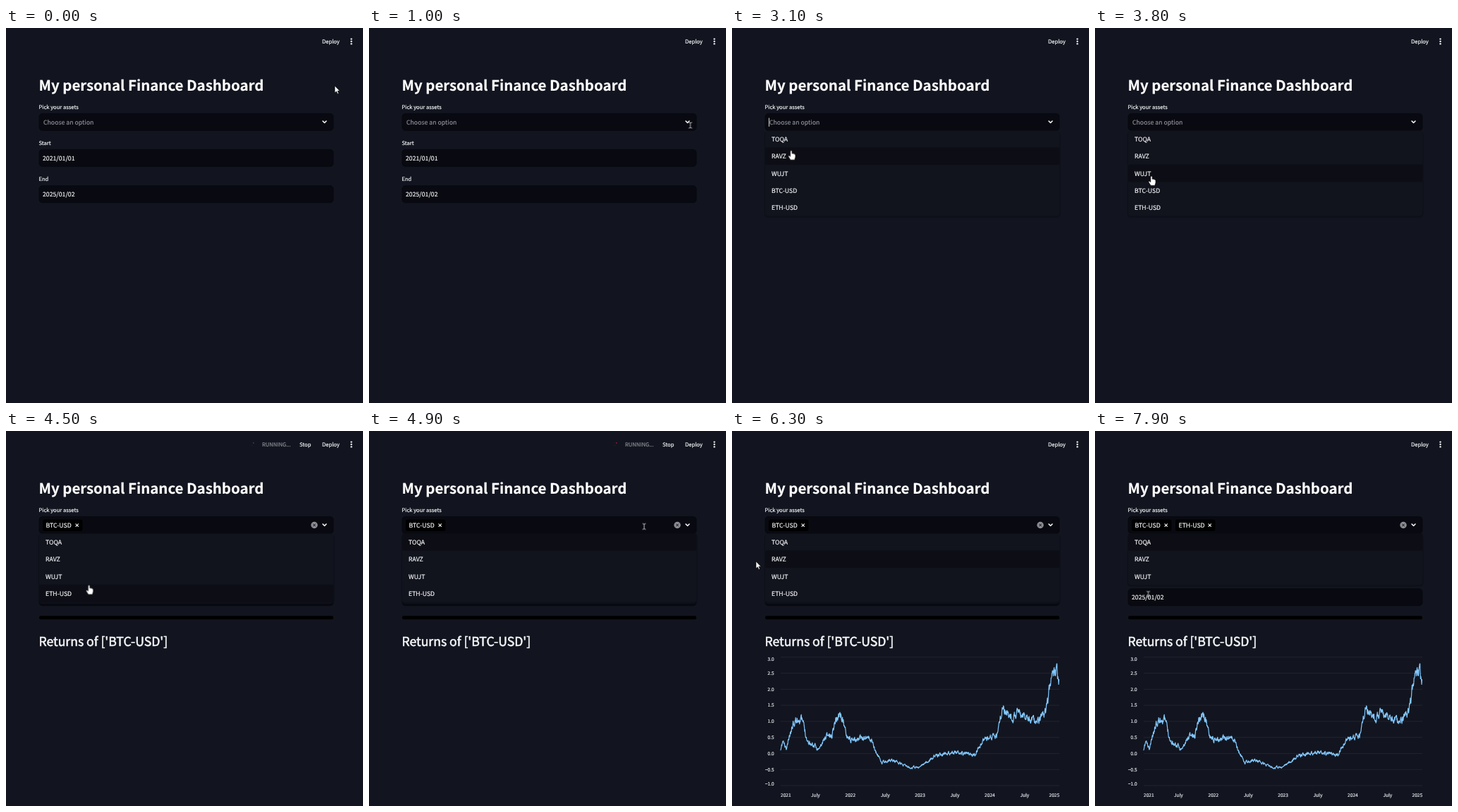
An HTML page that plays this animation: 506 px wide and 532 px high, repeating every 8 s.

```html
<!DOCTYPE html>
<html lang="en">
<head>
<meta charset="utf-8">
<title>Finance dashboard</title>
<style>
  html, body { margin: 0; width: 100%; height: 100%; overflow: hidden; background: #12151f; }
  svg { display: block; width: 506px; height: 532px; }
  text {
    font-family: "Noto Sans CJK JP", "Noto Sans CJK SC", "Noto Sans CJK KR", "Noto Sans CJK", "Open Sans", sans-serif;
    font-size: 8.72px; color: #f7f8fa; fill: currentColor; stroke: currentColor; stroke-width: .18px;
    text-rendering: geometricPrecision; white-space: pre;
  }
  .title { font-size: 20.42px; font-weight: 700; color: #fff; }
  .heading { font-size: 17.6px; stroke-width: .55px; }
  .small { font-size: 7.6px; }
  .axis { font-size: 6.6px; color: #eceff4; }
  .muted { color: #8d8f96; }
  .field { fill: #090a11; stroke: #07080d; stroke-width: .8; }
</style>
</head>
<body>
<svg id="stage" viewBox="0 0 506 532"></svg>
<script>
const LOOP = 8000, TICK = 100;
const LEFT = 47, WIDTH = 417, FIELD = 24, ROW = 24.2, TOP = 145.6;
const OPEN = 1900, FIRST_PICK = 4400, SECOND_PICK = 7900;
const fieldTops = [121.4, 172.4, 223.8];
const stage = document.getElementById('stage');

function add(parent, tag, attrs = {}, content) {
  const el = document.createElementNS('http://www.w3.org/2000/svg', tag);
  for (const key in attrs) el.setAttribute(key, attrs[key]);
  if (content !== undefined) el.textContent = content;
  parent.append(el);
  return el;
}
const group = (parent = stage) => add(parent, 'g');
const label = (parent, x, y, content, cls = '', anchor = 'start') =>
  add(parent, 'text', { x, y, class: cls, 'text-anchor': anchor }, content);
const box = (parent, x, y, width, height, rx, attrs) =>
  add(parent, 'rect', { x, y, width, height, rx, ...attrs });
const line = (parent, d, stroke, width) =>
  add(parent, 'path', { d, fill: 'none', stroke, 'stroke-width': width, 'stroke-linecap': 'round', 'stroke-linejoin': 'round' });
const cross = (parent, x, y, r, color, width) =>
  line(parent, `M${x - r} ${y - r}L${x + r} ${y + r}M${x - r} ${y + r}L${x + r} ${y - r}`, color, width);

// Play valueAt(time), held for one tick at a time.
function track(el, prop, valueAt) {
  const frames = [];
  for (let t = 0; t < LOOP; t += TICK)
    frames.push({ offset: t / LOOP, [prop]: valueAt(t), easing: 'steps(1, end)' });
  frames.push({ ...frames[frames.length - 1], offset: 1 });
  el.animate(frames, { duration: LOOP, iterations: Infinity });
}
const show = (el, from, to = LOOP) => track(el, 'opacity', t => Number(t >= from && t < to));

// Header
label(stage, 448, 22, 'Deploy', 'small');
for (const y of [15.6, 19, 22.4]) add(stage, 'circle', { cx: 489.5, cy: y, r: 1.2, fill: '#f7f8fa' });
const running = group();
label(running, 363, 22, 'RUNNING...', 'small muted');
label(running, 416, 22, 'Stop', 'small');
line(running, 'M350.5 16.5l.6 1', '#a01f35', 1.2);
line(running, 'M348 20l1 .6', '#431725', 1);
show(running, 4500, 5100);

// Form
label(stage, 46.5, 89.3, 'My personal Finance Dashboard', 'title');
['Pick your assets', 'Start', 'End'].forEach((name, i) => label(stage, 46.5, fieldTops[i] - 6.9, name, 'small'));
for (const y of fieldTops) box(stage, LEFT, y, WIDTH, FIELD, 4.5, { class: 'field' });
label(stage, 52, 187.9, '2021/01/01');
label(stage, 52, 239.3, '2025/01/02');
show(label(stage, 53, 136.9, 'Choose an option', 'muted'), 0, FIRST_PICK);
line(stage, 'M449 132l2.5 2.5l2.5 -2.5', '#fff', 1.5);

function chip(x, name, from) {
  const g = group();
  box(g, x, 125.5, 56.5, 16.6, 3, { fill: '#000' });
  label(g, x + 4.5, 136.9, name);
  cross(g, x + 48.7, 133.6, 1.8, '#f7f8fa', 1.1);
  show(g, from);
}
chip(52, 'BTC-USD', FIRST_PICK);
chip(114, 'ETH-USD', SECOND_PICK);
const clear = group();
add(clear, 'circle', { cx: 437, cy: 133.5, r: 4.7, fill: '#8c8e94' });
cross(clear, 437, 133.5, 1.5, '#0a0c13', 1);
show(clear, FIRST_PICK);

// Results
const results = group();
box(results, LEFT, 262.2, WIDTH, 5, 2.2, { fill: '#000' });
label(results, 46.5, 304.5, "Returns of ['BTC-USD']", 'heading');
show(results, 4500);

const chart = group();
for (let i = 0; i <= 8; i++) {
  const end = Math.sign(i % 8 ? 0 : i - 4);
  const y = 320.8 + i * 22.78;
  add(chart, 'path', { d: `M69 ${y}H464`, stroke: '#292c36', 'stroke-width': .7 });
  label(chart, 59.7, y + 2.3 - end * 2.8, (3 - i / 2).toFixed(1).replace('-', '\u2212'), 'axis', 'end');
  label(chart, 69 + i * 49.4, 519, i % 2 ? 'July' : 2021 + i / 2, 'axis', ['start', 'middle', 'end'][end + 1]);
}

const trend = [
  [69, 455], [72, 440], [77, 452], [87, 412], [97, 407], [101, 415], [107, 440], [123, 452], [135, 430], [141, 434],
  [146, 411], [153, 401], [158, 412], [161, 427], [170, 440], [192, 433], [200, 442], [203, 455], [213, 471],
  [226, 466], [251, 477], [266, 477], [289, 460], [316, 455], [344, 460], [358, 437], [375, 433],
  [384, 392], [396, 407], [408, 395], [416, 407], [432, 414], [445, 398], [452, 352], [460, 342], [464, 357]
];
let seed = 11;
const random = () => (seed = (seed * 16807) % 2147483647) / 2147483647;

// Noise grows with the price, like real returns.
function priceLine() {
  const points = [];
  let noise = 0;
  for (let x = 69, k = 0; x <= 463.6; x += .4) {
    while (x > trend[k + 1][0]) k++;
    const [x0, y0] = trend[k], [x1, y1] = trend[k + 1];
    const y = y0 + (y1 - y0) * (x - x0) / (x1 - x0);
    noise = noise * .6 + (random() - .5) * .1;
    points.push(`${x.toFixed(1)} ${(y + noise * (503 - y)).toFixed(1)}`);
  }
  return 'M' + points.join('L');
}
line(chart, priceLine(), '#83c9ff', 1.2);
show(chart, 5000);

// Pointer legs: start, end, x and y reached
const legs = [
  [0, 0, 466, 82], [400, 700, 373, 132], [700, 1000, 455.5, 138], [2300, 2400, 421, 140.5],
  [2400, 3000, 84, 172], [3000, 3800, 80, 210], [3800, 4000, 86, 228], [4400, 4900, 390, 135.5],
  [4900, 5600, 444, 142], [5700, 6300, 34, 185], [6400, 6700, 80, 221], [6700, 7200, 73, 230],
  [7800, 7900, 75.5, 231.5]
];
const smooth = u => u * u * (3 - 2 * u);
function pointerAt(t) {
  let [, , x, y] = legs[0];
  for (const [from, to, toX, toY] of legs.slice(1)) {
    const u = smooth(Math.min(1, Math.max(0, (t - from) / (to - from))));
    x += (toX - x) * u;
    y += (toY - y) * u;
  }
  return { x, y };
}

// Option lists; the row last under the pointer stays marked.
const stocks = ['TOQA', 'RAVZ', 'WUJT'];
const menus = [
  { names: [...stocks, 'BTC-USD', 'ETH-USD'], from: OPEN, to: FIRST_PICK },
  { names: [...stocks, 'ETH-USD'], from: FIRST_PICK, to: SECOND_PICK },
  { names: stocks, from: SECOND_PICK, to: LOOP }
];
function rowAt(t, { names, from, to }) {
  if (t < from || t >= to) return -1;
  const { x, y } = pointerAt(t);
  const row = Math.floor((y - TOP) / ROW);
  return x >= LEFT && x <= LEFT + WIDTH && row < names.length ? row : -1;
}
for (const menu of menus) {
  const { names, from, to } = menu;
  const g = group(), height = names.length * ROW;
  box(g, 45.8, TOP + 1, 419.6, height + 1.6, 5, { fill: '#0e1019' });
  box(g, LEFT, TOP, WIDTH + .4, height, 4, { fill: '#11131d' });
  const mark = box(g, LEFT, TOP, WIDTH + .4, ROW, 2, { fill: '#0d0e15' });
  let marked = 0;
  track(mark, 'transform', t => {
    const row = rowAt(t, menu);
    if (row >= 0) marked = row;
    return `translate(0px, ${marked * ROW}px)`;
  });
  names.forEach((name, i) => label(g, 56, 161.2 + i * ROW, name));
  show(g, from, to);
}

const caret = line(stage, 'M52.5 128V139.5', '#e8e9ec', .9);
track(caret, 'opacity', t => Number(t >= 2000 && t < 4200 && t % 1000 < 500));

// Pointer
const pointer = group();
const solid = d => add(pointer, 'path', { d, fill: '#fff', stroke: '#000', 'stroke-width': .6, 'stroke-linejoin': 'round' });
const shapes = {
  arrow: solid('M0 0V10L2.3 7.9L3.9 11.4L5.5 10.7L4 7.3H7Z'),
  beam: line(pointer, 'M-2 -4Q0 -4 0 -3Q0 -4 2 -4M0 -3V3M-2 4Q0 4 0 3Q0 4 2 4', '#d4d5d8', .9),
  hand: solid('M-1.2 1Q0 -1 1.2 1V4.4Q2.4 3.6 3 4.8Q4.4 4.2 4.8 5.4Q6 5.2 6 6.6V9.6L4.8 13.4H-1L-4 8.6Q-4.4 7 -3 7.2L-1.2 8.6Z')
};
function shapeAt(t) {
  const { x, y } = pointerAt(t);
  if (menus.some(menu => rowAt(t, menu) >= 0)) return 'hand';
  const overField = x >= LEFT && x <= LEFT + WIDTH && fieldTops.some(top => y >= top && y <= top + FIELD);
  return overField ? 'beam' : 'arrow';
}
track(pointer, 'transform', t => {
  const { x, y } = pointerAt(t);
  return `translate(${x}px, ${y}px)`;
});
for (const name in shapes) track(shapes[name], 'opacity', t => Number(shapeAt(t) === name));
</script>
</body>
</html>
```
